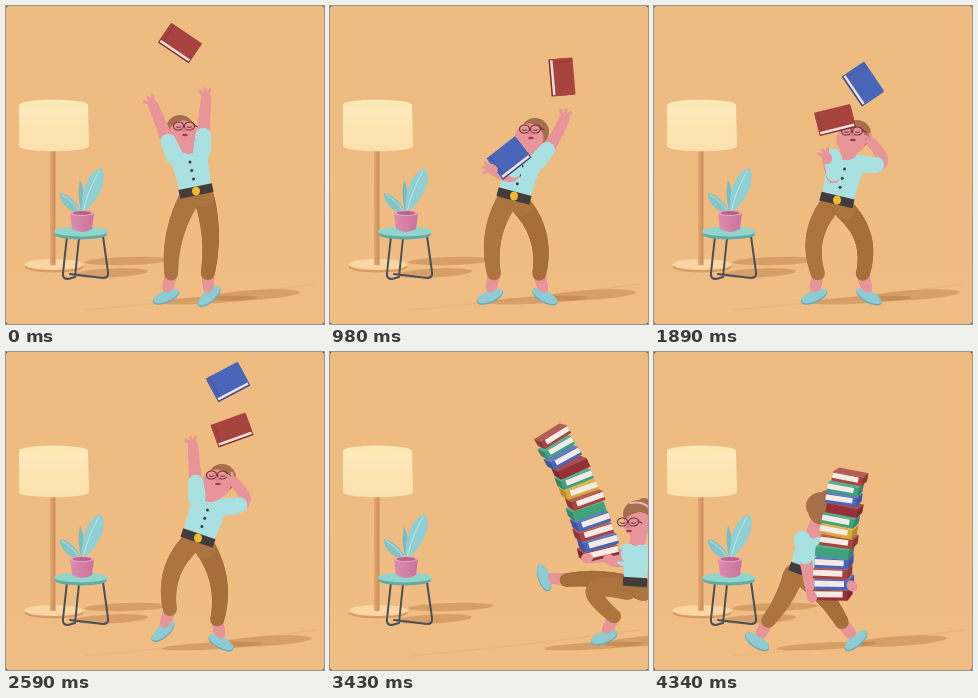
An HTML page with a canvas for the animation above (4.41 s loop, 318x318 px).

```html
<!DOCTYPE html>
<html lang="en">
<head>
<meta charset="utf-8">
<title>Juggling books</title>
<style>
html, body { margin: 0; width: 100%; height: 100%; overflow: hidden; background: #75604a; }
canvas { display: block; width: 318px; height: 318px; border-radius: 3px; }
</style>
</head>
<body>
<canvas id="stage" width="318" height="318"></canvas>
<script>
const c = document.getElementById('stage').getContext('2d');
const LOOP = 4410, STEP = 70, CUT = 3150, ENTER = 3430, TURN = 3920, END = 4340;
const SKIN = '#e8959a', SHIRT = '#a9e0e2', PANTS = '#ab7540', SHOE = '#8fcbd3', HAIR = '#a66f4c', DARK = '#443c3c';
const RED = '#a8443f', BLUE = '#4a66b8', GREEN = '#3fa27c', WINE = '#963038', GOLD = '#d8ab36';
const SHADE = 'rgba(165,100,50,.33)';

// time, head, hip, left hand, right hand
const juggle = [
  [0, 178,127, 190,185, 147,99, 200,92],
  [980, 200,130, 184,190, 162,163, 234,113],
  [1890, 198,132, 183,194, 173,152, 218,137],
  [2590, 211,130, 192,186, 187,94, 228,130]
];
juggle.push([3080, ...juggle[2].slice(1)]);

// the same, then the lean of the pile
const carry = [
  [ENTER, 309,166, 305,230, 279,207, 257,206, -45],
  [TURN, 110,167, 128,239, 130,227, 162,228, 27],
  [END, 168,158, 147,218, 158,245, 198,234, 17]
];
const pileColors = [WINE, BLUE, RED, BLUE, GREEN, RED, GOLD, GREEN, WINE, BLUE, GREEN, RED];

// time, x, y, degrees: where each book meets a hand or passes through the air
const redPath = [
  [0, 174,37, 34], [560, 219,98, 60], [980, 232,71, 85], [1890, 181,114, 346], [2590, 226,78, 700], [2870, 222,122, 735]
];
const bluePath = [
  [0, 215,-42, -180], [420, 165,130, -40], [980, 179,152, -38], [1330, 176,148, -30],
  [1890, 209,78, 56], [2150, 218,124, 120], [2590, 222,30, 332], [3010, 185,140, 390]
];

const mix = (a, b, u) => a + (b - a) * u;
const mixPt = (a, b, u) => [mix(a[0], b[0], u), mix(a[1], b[1], u)];
const clamp = v => Math.max(0, Math.min(1, v));
const ease = (t, a, b) => { const u = clamp((t - a) / (b - a)); return u * u * (3 - 2 * u); };
const noise = i => { const v = Math.sin(i * 91.7 + 4) * 4375.5; return 2 * (v - Math.floor(v)) - 1; };

function segment(keys, t) {
  let i = 0;
  while (i < keys.length - 2 && t >= keys[i + 1][0]) i++;
  return i;
}

// Smooth curve through the keys
function sample(keys, t) {
  const i = segment(keys, t), a = keys[i], b = keys[i + 1];
  const p = keys[i - 1] || a, n = keys[i + 2] || b;
  const d = b[0] - a[0], u = clamp((t - a[0]) / d), w = 1 - u;
  return a.map((v, k) => {
    const ma = (b[k] - p[k]) / (b[0] - p[0]) * d, mb = (n[k] - v) / (n[0] - a[0]) * d;
    return v * (1 + 2 * u) * w * w + ma * u * w * w + b[k] * u * u * (3 - 2 * u) - mb * u * u * w;
  });
}

// Short moves are carried by hand, long ones fall freely
function flight(keys, t) {
  const i = segment(keys, t), a = keys[i], b = keys[i + 1], d = b[0] - a[0];
  const u = clamp((t - a[0]) / d);
  const held = Math.hypot(b[1] - a[1], b[2] - a[2]) < 28;
  const rise = held ? 0 : .0007 * d * d * u * (1 - u);
  return [mix(a[1], b[1], u), mix(a[2], b[2], u) - rise, mix(a[3], b[3], u) * Math.PI / 180];
}

function oval(x, y, rx, ry, color, turn = 0) {
  c.fillStyle = color;
  c.beginPath();
  c.ellipse(x, y, rx, ry, turn, 0, 7);
  c.fill();
}

function poly(color, ...pts) {
  c.fillStyle = color;
  c.beginPath();
  pts.forEach(p => c.lineTo(p[0], p[1]));
  c.closePath();
  c.fill();
}

function line(color, width, path) {
  c.strokeStyle = color;
  c.lineWidth = width;
  c.stroke(new Path2D(path));
}

function fillPath(color, path) {
  c.fillStyle = color;
  c.fill(new Path2D(path));
}

function ramp(x0, y0, x1, y1, ...colors) {
  const g = c.createLinearGradient(x0, y0, x1, y1);
  colors.forEach((v, i) => g.addColorStop(i / (colors.length - 1), v));
  return g;
}

function joint(a, b, reach, bend) {
  const dx = b[0] - a[0], dy = b[1] - a[1], d = Math.hypot(dx, dy) || 1;
  const h = bend * Math.sqrt(Math.max(0, reach * reach - d * d / 4)) / d;
  return [(a[0] + b[0]) / 2 - dy * h, (a[1] + b[1]) / 2 + dx * h];
}

// Tapered bent tube, drawn up to the fraction "end"
function limb(a, k, b, r0, r1, color, end = 1) {
  const mid = mixPt(a, b, .5), m = mixPt(mid, k, 1.6);
  for (let i = 0; i <= 40; i++) {
    const u = end * i / 40, r = mix(r0, r1, i / 40);
    const [x, y] = mixPt(mixPt(a, m, u), mixPt(m, b, u), u);
    oval(x, y, r, r, color);
  }
}

function room() {
  c.fillStyle = ramp(0, 0, 0, 318, '#eebb80', '#eebb81', '#f0bd84');
  c.fillRect(0, 0, 318, 318);
  line('rgba(190,130,70,.1)', 1.5, 'M80 304Q190 294 310 278');
  oval(121, 255, 43, 4, SHADE, -.03);
  oval(104, 267, 38, 4.5, SHADE, -.05);
  oval(48, 261, 29.5, 5.5, '#d99d64');
  oval(48, 258.5, 29.5, 5.5, '#fbd6a4');
  c.fillStyle = ramp(44, 0, 50, 0, '#e2a873', '#c98a55');
  c.fillRect(44, 140, 5.5, 119);
  fillPath(ramp(0, 94, 0, 146, '#fdebc0', '#fde5b2', '#fbe0ac'), 'M13 99C13 92 82 92 82 99L83 140C82 147 14 147 13 140Z');
  oval(47.5, 99, 34, 4.5, '#fbe9b4');
}

function plant() {
  c.lineCap = c.lineJoin = 'round';
  line('#4b5059', 2, 'M61 230L57 267Q56 273 62 273L69 271L73 232M64 268L97 272Q103 272 102 266L97 230');
  oval(75, 228.5, 26, 5, '#62aaa5');
  oval(75, 225.5, 27, 5, '#91d6cc');
  fillPath('#79bdc2', 'M76 208C72 195 72 184 74 174C79 184 79 196 77 208Z');
  fillPath('#8fd0d4', 'M76 208C74 186 82 166 95 162C102 172 95 192 78 206Z');
  fillPath('#83c4c8', 'M74 208C61 205 53 195 54 187C65 189 73 199 76 208Z');
  line('#c7ecea', .8, 'M77 206Q82 184 93 165M74 206Q66 194 56 189');
  fillPath(ramp(64, 0, 88, 0, '#dc8db0', '#c9749c'), 'M64 207L66 223Q76 229 86 223L88 207Z');
  oval(76, 207, 12, 3, '#e9a9c2');
  oval(76, 207, 9.5, 2, '#b76789');
}

function posed(x, y, turn, draw) {
  c.save();
  c.translate(x, y);
  c.rotate(turn);
  draw();
  c.restore();
}

function rect(color, x, y, w, h) {
  c.fillStyle = color;
  c.fillRect(x, y, w, h);
}

function book([x, y, turn], color, w, d) {
  posed(x, y, turn, () => {
    rect(color, -w / 2, 1 - d / 2, w, d);
    rect('rgba(40,10,40,.3)', -w / 2, 1 - d / 2, w, d);
    rect('#f3e3da', 1 - w / 2, -d / 2, w - 2, d - .5);
    rect(color, -w / 2, -1 - d / 2, w, d - 2);
    rect('rgba(60,10,40,.16)', 3 - w / 2, -1 - d / 2, 1.2, d - 2);
  });
}

function slab(x, y, turn, color, pages, size, flip) {
  posed(x, y, turn, () => {
    c.scale(flip * size, size);
    const top = [[-20, -4], [-14, -10], [20, -10], [15, -4]];
    poly(color, ...top);
    poly('rgba(255,255,255,.14)', ...top);
    poly(color, [-20, -4], [15, -4], [20, -10], [20, -1], [15, 6], [-20, 6]);
    if (pages) poly('#f3ebe5', [-20, -3], [10, -3], [10, 3], [-20, 3]);
    poly('rgba(40,10,40,.2)', [15, -4], [20, -10], [20, -1], [15, 6]);
  });
}

function drawPile(hands, lean, t) {
  const [bx, by] = mixPt(hands[0], hands[1], .5), last = pileColors.length - 1;
  pileColors.forEach((color, i) => {
    const u = i / last;
    const x = bx + lean * u ** 1.5 + 3 * noise(i), y = by - 5 + mix(8, 0, ease(t, END, TURN)) - 116 * u;
    const turn = lean * (.004 + .008 * u) + .07 * noise(i + 20);
    slab(x, y, turn, color, i % 4 || !i, mix(1, .88, u), t < 3640 ? -1 : 1);
  });
}

function leg(hip, foot, bend, color) {
  const [x, y, tilt] = foot, d = Math.hypot(hip[0] - x, hip[1] - y);
  const cuff = mixPt(foot, hip, 23 / d), ankle = mixPt(foot, hip, 8 / d);
  limb(cuff, mixPt(cuff, foot, .5), ankle, 6, 5, SKIN);
  oval(x, y + 1, 14, 6, '#69a9b6', tilt);
  oval(x, y, 13.5, 5.5, SHOE, tilt);
  oval(ankle[0], ankle[1], 5, 4, SKIN, tilt);
  limb(hip, joint(hip, cuff, 39, bend), cuff, 10.5, 7, color);
}

// Left and right foot: x, y, tilt
function feet(t) {
  if (t < CUT) {
    const lift = Math.exp(-(((t - 2590) / 250) ** 2)), plant = ease(t, 0, 500);
    return [[160 - 3 * lift, 290 - 11 * lift, -.4 - .3 * lift], [mix(203, 215, plant), 290, mix(-.7, .5, plant)]];
  }
  const stride = ease(t, ENTER, TURN), land = ease(t, ENTER, 3640), spin = ease(t, TURN, END);
  return [
    [mix(274, 103, stride), 285 + 4 * spin - 14 * Math.sin(Math.PI * stride), mix(mix(-.35, .9, stride), .6, spin)],
    [mix(214, 205, land) - 3 * spin, mix(225, 288, land), mix(mix(1.25, .5, land), -.7, spin)]
  ];
}

function hand(p, elbow, open) {
  const a = Math.atan2(p[1] - elbow[1], p[0] - elbow[0]);
  oval(p[0], p[1], 6, 5, SKIN, a);
  if (open) for (const s of [-.8, -.2, .35]) {
    line(SKIN, 3.2, `M${p}l${9 * Math.cos(a + s)} ${9 * Math.sin(a + s)}`);
  }
}

function head([x, y], carrying, t) {
  posed(x, y, 0, () => {
    if (carrying) oval(5, -15, 6, 5, HAIR);
    oval(carrying ? 0 : mix(-4, 5, ease(t, 0, 700)), -4, carrying ? 16 : 14, 14, HAIR);
    if (t > 4100) return oval(0, 0, 14, 15, HAIR);
    oval(-1, carrying ? 5 : 2, 14.5, 14.5, SKIN);
    if (carrying) {
      fillPath(HAIR, 'M-15 2Q-14 -16 2 -17Q17 -14 15 5Q10 -5 1 -6Q-8 -5 -15 2Z');
      line('#e9b7b2', 2, 'M-9 -15Q12 -19 15 3');
    }
    c.translate(carrying ? mix(-11, -1, ease(t, ENTER, TURN)) : 0, carrying ? 4 : -7);
    for (const s of [-5.5, 5.5]) {
      c.strokeStyle = '#74313d';
      c.lineWidth = 1.2;
      c.beginPath();
      c.ellipse(s, 0, 5, 4, -.1, 0, 7);
      c.stroke();
      line('#4b3030', 1, `M${s - 2} 1q2 1 4 0`);
    }
    line('#74313d', 1.2, 'M10 -1L14 1');
    oval(0, 4, 2.3, 2, '#dd7f88');
    oval(1, 9, 3, 1.3, '#a23c4b');
  });
}

function torso(chest, hip, side, half, carrying) {
  const across = (p, s) => [p[0] + side[0] * s, p[1] + side[1] * s];
  const waist = mixPt(chest, hip, .8);
  poly(SHIRT, across(chest, -half), across(chest, half), across(waist, half - 2), across(waist, 2 - half));
  c.strokeStyle = SHIRT;
  c.lineWidth = 9;
  c.stroke();
  c.lineCap = 'butt';
  line(DARK, 9, `M${across(hip, -half - 3)}L${across(hip, half + 3)}`);
  c.lineCap = 'round';
  if (carrying) return;
  oval(hip[0], hip[1], 4, 4.5, '#efba32');
  oval(chest[0], chest[1] - 6, 9, 6, SKIN);
  for (const u of [.22, .45, .68]) oval(...mixPt(chest, hip, u), 1.5, 1.5, DARK);
}

function person(t) {
  const carrying = t >= CUT, p = sample(carrying ? carry : juggle, t);
  const face = [p[1], p[2]], hip = [p[3], p[4]], hands = [[p[5], p[6]], [p[7], p[8]]];
  const chest = mixPt(face, hip, carrying ? .54 : .36), half = carrying ? 9 : 14;
  const len = Math.hypot(hip[0] - chest[0], hip[1] - chest[1]);
  const side = [(hip[1] - chest[1]) / len, (chest[0] - hip[0]) / len];
  const [left, right] = feet(t);
  const bend = carrying ? mix(1, -.5, ease(t, ENTER, 3850)) * mix(1, .2, ease(t, TURN, END)) : .6;

  oval(Math.max(left[0], right[0]) + 45, 289, 46, 5, SHADE, -.06);
  oval((left[0] + right[0]) / 2 + 20, 294, 50, 3.5, SHADE, -.05);

  const sockets = [-8, 8].map(s => [hip[0] + side[0] * s, hip[1] + side[1] * s + 8]);
  leg(sockets[1], right, carrying ? bend : -bend, '#a56f3c');
  leg(sockets[0], left, bend, PANTS);
  limb(sockets[0], hip, sockets[1], 10, 10, PANTS);

  limb(chest, mixPt(chest, face, .5), face, 8, 7, SKIN);
  torso(chest, hip, side, half, carrying);
  head(face, carrying, t);

  const elbows = hands.map((h, i) => {
    const s = i ? 1 : -1;
    const shoulder = [chest[0] + side[0] * half * s, chest[1] + side[1] * half * s];
    const elbow = joint(shoulder, h, 25, carrying ? (h[0] - shoulder[0]) / 60 : s);
    limb(shoulder, elbow, h, 7, 5, SKIN);
    limb(shoulder, elbow, h, 8.5, 7.5, SHIRT, .3);
    return elbow;
  });

  if (carrying) drawPile(hands, p[9], t);
  else {
    book(flight(redPath, t), RED, 37, 22);
    book(flight(bluePath, t), BLUE, 36, 25);
  }
  hands.forEach((h, i) => hand(h, elbows[i], !carrying));
}

function frame(now) {
  const t = Math.floor(now % LOOP / STEP) * STEP;
  room();
  plant();
  c.save();
  if (t >= CUT) c.translate(Math.max(0, ENTER - t) * .38, 0);
  person(t);
  c.restore();
  requestAnimationFrame(frame);
}
frame(0);
</script>
</body>
</html>
```
